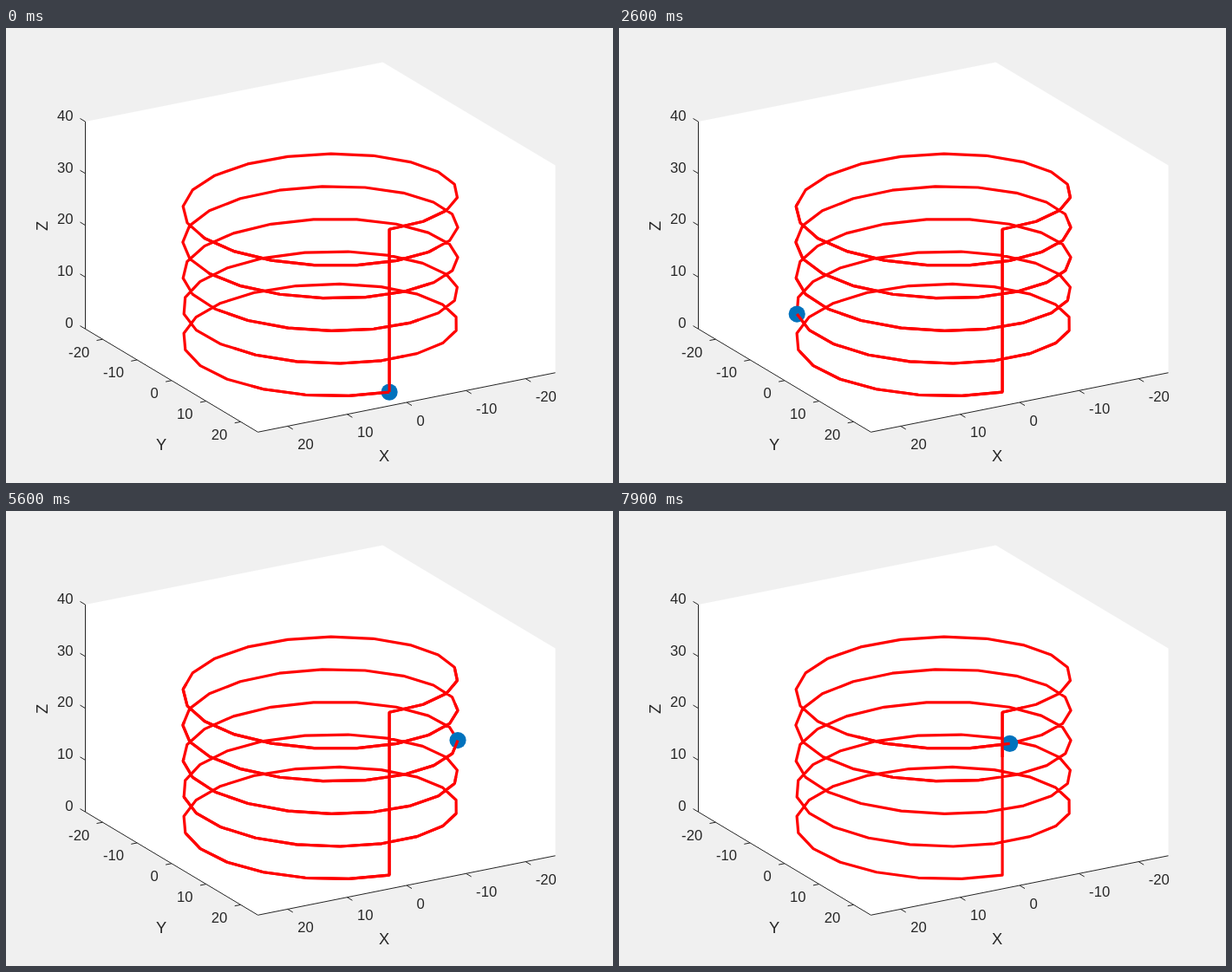
Animation of 700x525 px, one loop 8000 ms. Source, as an HTML page:

```html
<!DOCTYPE html>
<html lang="en">
<head>
<meta charset="utf-8">
<title>Helix</title>
<style>
  html, body { margin: 0; width: 100%; height: 100%; overflow: hidden; background: #f0f0f0; }
  svg { display: block; width: 700px; height: 525px; }
  text { font-family: "Liberation Sans", Arial, sans-serif; font-size: 16.67px; fill: #262626; }
  .name { font-size: 18.33px; text-anchor: middle; }
  .axis { fill: none; stroke: #262626; stroke-width: 1; }
  .curve { fill: none; stroke: #f00; stroke-width: 3.2; stroke-linejoin: round; }
</style>
</head>
<body>
<svg id="stage" viewBox="0 0 700 525"></svg>
<script>
const STEP_MS = 100, STEPS = 80, SEGMENTS = 99, RADIUS = 20, LIMIT = 25;
const AX = [-6.86, 1.37], AY = [3.98, 2.38], UP = 5.98;
const ORIGIN = [362.5, 372.5];
const TILT = Math.tan(20 * Math.PI / 180);
const stage = document.getElementById('stage');

function add(tag, attrs, content = '') {
  const el = document.createElementNS('http://www.w3.org/2000/svg', tag);
  for (const key in attrs) el.setAttribute(key, attrs[key]);
  el.textContent = content;
  return stage.appendChild(el);
}

// Orthographic projection; a larger depth value is nearer to the viewer.
function project(x, y, z) {
  const floor = x * AX[1] + y * AY[1];
  return {
    x: ORIGIN[0] + x * AX[0] + y * AY[0],
    y: ORIGIN[1] + floor - z * UP,
    depth: floor / TILT + z * UP * TILT
  };
}

const line = points => 'M' + points.map(p => p.x.toFixed(2) + ' ' + p.y.toFixed(2)).join('L');
const between = (a, b, k) => ({ x: a.x + (b.x - a.x) * k, y: a.y + (b.y - a.y) * k });

function drawTick(p, dir, label, dx, dy, anchor) {
  const k = 7 / Math.hypot(dir[0], dir[1]);
  add('path', { class: 'axis', d: line([p, { x: p.x + dir[0] * k, y: p.y + dir[1] * k }]) });
  add('text', { x: p.x + dx, y: p.y + dy, 'text-anchor': anchor }, label);
}

function drawAxes() {
  const L = LIMIT;
  const outline = [[L, -L, 0], [L, -L, 40], [-L, -L, 40], [-L, L, 40], [-L, L, 0], [L, L, 0]];
  add('path', { d: line(outline.map(c => project(...c))) + 'Z', fill: '#fff' });
  const edges = [[L, -L, 40], [L, -L, 0], [L, L, 0], [-L, L, 0]];
  add('path', { class: 'axis', d: line(edges.map(c => project(...c))) });
  for (let v = -20; v <= 20; v += 10) {
    drawTick(project(v, L, 0), AY, v, 11.5, 26.5, 'start');
    drawTick(project(L, v, 0), AX, v, -15.2, 20.5, 'end');
    drawTick(project(L, -L, v + 20), [-AY[0], -AY[1]], v + 20, -14, -1.3, 'end');
  }
  add('text', { class: 'name', x: 436, y: 500 }, 'X');
  add('text', { class: 'name', x: 179, y: 487 }, 'Y');
  add('text', { class: 'name', transform: 'translate(48 228.5) rotate(-90)' }, 'Z');
}

const helix = Array.from({ length: SEGMENTS + 1 }, (_, i) => {
  const t = 10 * Math.PI * i / SEGMENTS;
  return project(RADIUS * Math.sin(t), RADIUS * Math.cos(t), t);
});
const loop = [...helix, helix[0]];

drawAxes();
add('path', { class: 'curve', d: line(helix) + 'Z' });
const marker = add('circle', { r: 9.6, fill: '#0072bd' });
const front = add('path', { class: 'curve' });

// Parts of the curve that lie nearer than the marker.
function nearer(depth) {
  let d = '';
  for (let i = 0; i < loop.length - 1; i++) {
    const a = loop[i], b = loop[i + 1];
    const nearA = a.depth >= depth, nearB = b.depth >= depth;
    if (!nearA && !nearB) continue;
    const cut = between(a, b, (depth - a.depth) / (b.depth - a.depth));
    d += line([nearA ? a : cut, nearB ? b : cut]);
  }
  return d;
}

let shown = -1;
function render(time) {
  const step = Math.floor(time / STEP_MS) % STEPS;
  if (step !== shown) {
    const p = helix[step];
    marker.setAttribute('cx', p.x);
    marker.setAttribute('cy', p.y);
    front.setAttribute('d', nearer(p.depth + 1e-6));
    shown = step;
  }
}

const start = performance.now();
function tick() {
  render(performance.now() - start);
  requestAnimationFrame(tick);
}
render(0);
requestAnimationFrame(tick);
</script>
</body>
</html>
```
